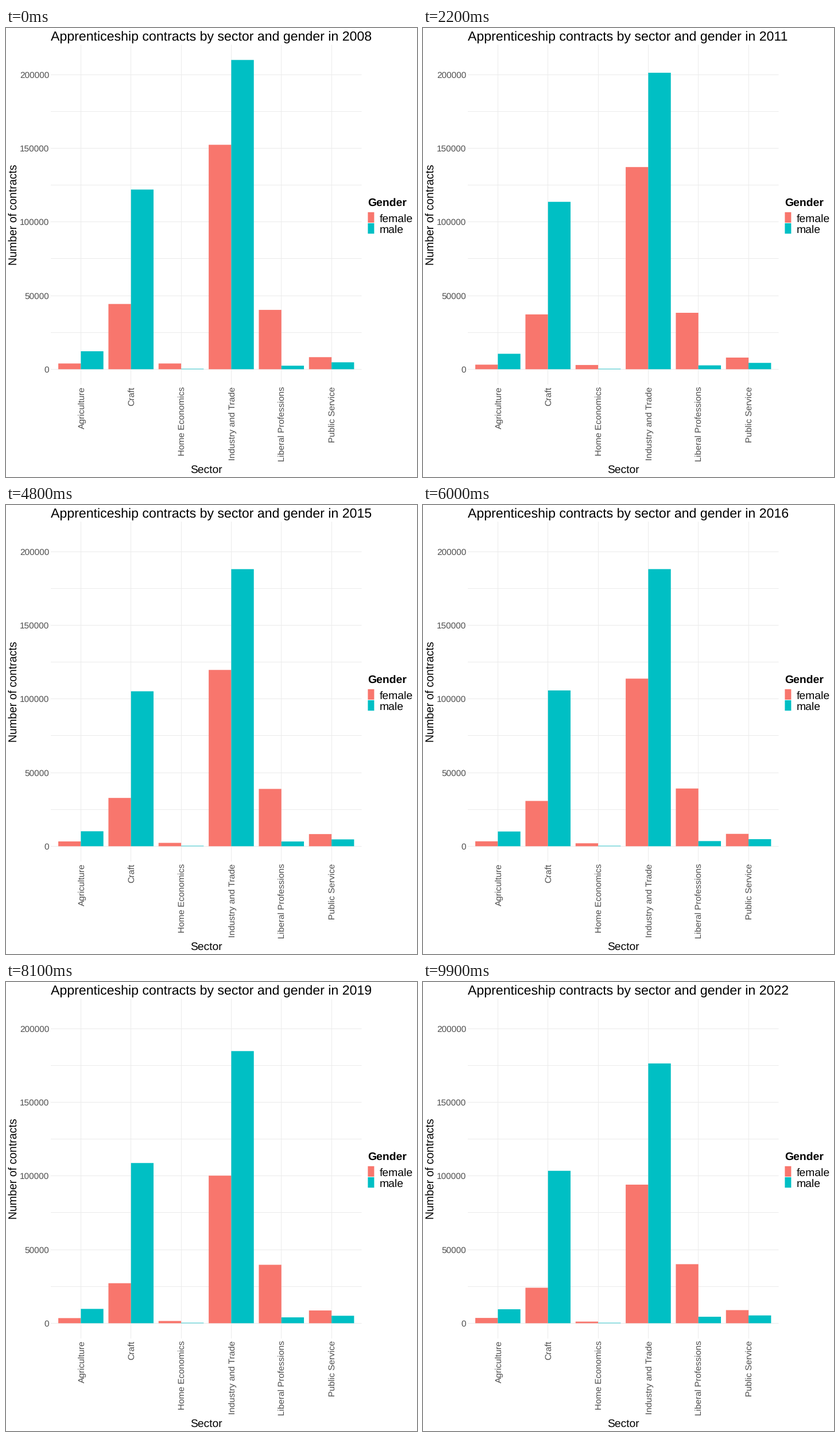
These frames come from a looping animation (716 px wide and 782 px high, 10 s). A matplotlib script:

```python
import numpy as np
import matplotlib.pyplot as plt
from matplotlib.animation import FuncAnimation
from matplotlib.patches import Rectangle

W, H, DPI = 716, 782, 64
FRAMES, INTERVAL = 100, 100
FIRST, LAST = 2008, 2022
BASE, PX_PER_K = 594.3, 2.565
LEFT, RIGHT, TOP, BOTTOM = 78, 619.5, 29, 621
FEMALE, MALE, GRID, GREY = "#F8766D", "#00BFC4", "#EBEBEB", "#4D4D4D"

# Contracts in thousands (female, male) at the turning points: slow sectors
# bend once, the big ones follow the economy.
SLOW = [2008, 2011, 2022]
CYCLE = [2008, 2009, 2011, 2013, 2016, 2019, 2020, 2022]
SECTORS = {
    "Agriculture": ([3.9, 3.1, 3.6], [12.2, 10.5, 9.5]),
    "Craft": ([44.3, 37.4, 24.1],
              [122, 113.6, 114.3, 105.5, 105, 110.5, 106.5, 103.5]),
    "Home Economics": ([3.9, 2.9, 1.1], [0.3, 0.3, 0.3]),
    "Industry and Trade": (
        [152.4, 140.2, 138.1, 126.5, 115, 106.6, 91.7, 94.1],
        [210, 190.8, 202.2, 189.8, 187, 195.2, 170.9, 176.4]),
    "Liberal Professions": ([40.3, 38.3, 40.1], [2.4, 2.6, 4.4]),
    "Public Service": ([8.2, 7.9, 8.9], [4.7, 4.3, 5.3]),
}
STEP = (RIGHT - LEFT) / (len(SECTORS) + 0.2)
HALF = 0.45 * STEP

plt.rcParams.update({"font.family": "Liberation Sans",
                     "text.hinting": "none"})
fig = plt.figure(figsize=(W / DPI, H / DPI), dpi=DPI, facecolor="white")
ax = fig.add_axes([0, 0, 1, 1])
ax.set(xlim=(0, W), ylim=(H, 0))
ax.axis("off")


def box(x, y, w, h, color, z=1):
    return ax.add_patch(Rectangle((x, y), w, h, facecolor=color,
                                  linewidth=0, snap=False, zorder=z))


def label(x, y, text, px, color="black", **kw):
    return ax.text(x, y, text, fontsize=px * 72 / DPI, color=color,
                   va="baseline", rotation_mode="anchor", **kw)


def height(thousands):
    return BASE - thousands * PX_PER_K


def frame_of(year):
    return round((year - FIRST) * (FRAMES - 1) / (LAST - FIRST))


# Horizontal grid and value labels
for k in range(0, 201, 25):
    y = int(height(k))
    box(LEFT, y, RIGHT - LEFT, 1, GRID)
    if k % 50 == 0:
        label(75.4, y + 6, k * 1000, 15.4, GREY, ha="right")

# Sector columns: grid line, label and two bars
bars = []
for i, (name, pair) in enumerate(SECTORS.items()):
    x = LEFT + STEP * (i + 0.6)
    box(int(x), TOP, 1, BOTTOM - TOP, GRID)
    label(round(x + 6.5), 624.6, name, 15.4, GREY, rotation=90, ha="right")
    for values, color, x0 in zip(pair, (FEMALE, MALE), (x - HALF, x)):
        years = SLOW if len(values) == len(SLOW) else CYCLE
        stops = [frame_of(y) for y in years]
        bars.append((box(x0, BASE, HALF, 0, color, z=3), stops, values))

title = label(LEFT, 22, "", 23.15)
label(349, 775, "Sector", 19.3, ha="center")
label(19, 325, "Number of contracts", 19.5, rotation=90, ha="center")

# Legend
label(630, 310, "Gender", 19.4, weight="bold")
for text, color, y in (("female", FEMALE, 320.8), ("male", MALE, 340)):
    box(630.4, y, 11, 18.2, color)
    label(651, round(y + 17), text, 19.4)


def draw(i):
    year = round(FIRST + (LAST - FIRST) * i / (FRAMES - 1))
    title.set_text(f"Apprenticeship contracts by sector and gender in {year}")
    for bar, stops, values in bars:
        top = height(np.interp(i, stops, values))
        bar.set_y(top)
        bar.set_height(BASE - top)
    return [title] + [b[0] for b in bars]


anim = FuncAnimation(fig, draw, frames=FRAMES, interval=INTERVAL,
                     repeat=True, repeat_delay=0)
plt.show()
```
